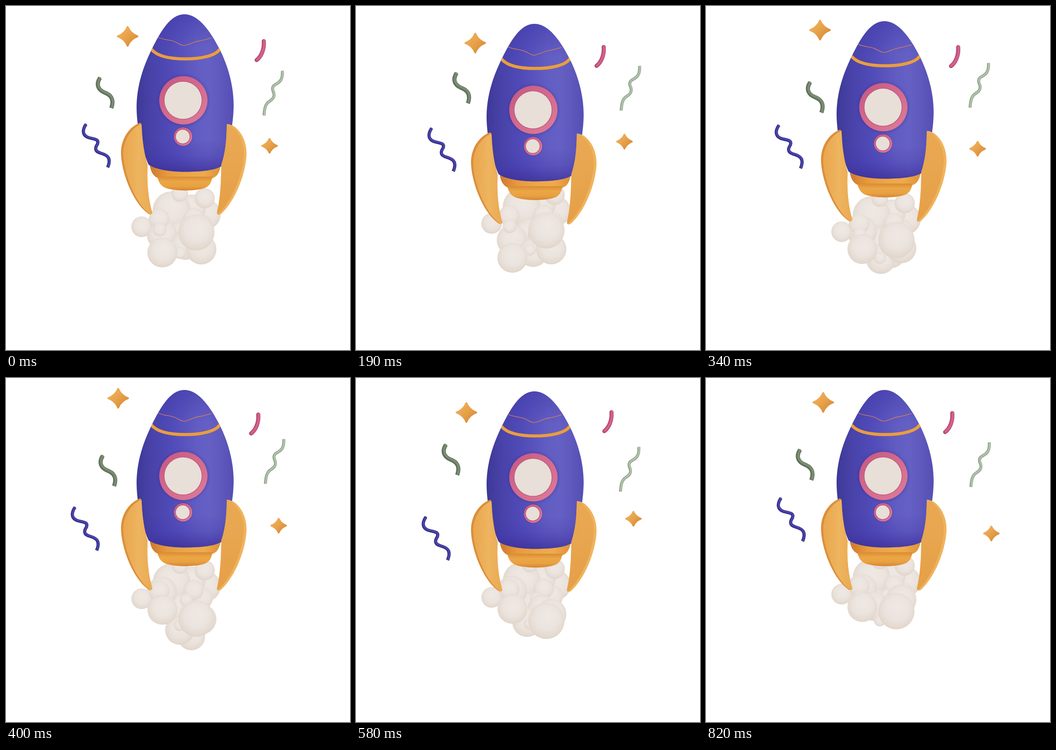
Recreate the animation shown at these times as an HTML page with a canvas. Size 748x748 px, loop 850 ms.

```html
<!DOCTYPE html>
<html lang="en">
<head>
<meta charset="utf-8">
<title>Rocket</title>
<style>
  html, body { margin: 0; width: 100%; height: 100%; overflow: hidden; background: #fff; }
  canvas { display: block; width: 748px; height: 748px; }
</style>
</head>
<body>
<canvas id="stage" width="748" height="748"></canvas>
<script>
const ctx = document.getElementById('stage').getContext('2d');
const LOOP = 850, HOLD = 70, STEP = 30;
const KEYS = [0, 3, 8, 12, 18, 22, 26], LAST = KEYS.length - 1;

// Smooth wander from 0 through the given offsets at the key steps
function wander(...offsets) {
  const v = [0, ...offsets];
  const slope = i => {
    const a = Math.max(i - 1, 0), b = Math.min(i + 1, LAST);
    return (v[b] - v[a]) / (KEYS[b] - KEYS[a]);
  };
  return k => {
    let i = 0;
    while (i < LAST - 1 && k >= KEYS[i + 1]) i++;
    const h = KEYS[i + 1] - KEYS[i], u = (k - KEYS[i]) / h, w = 1 - u;
    return v[i] * w * w * (1 + 2 * u) + v[i + 1] * u * u * (3 - 2 * u)
      + h * u * w * (slope(i) * w - slope(i + 1) * u);
  };
}
const still = () => 0;

function gradient(coords, ...colors) {
  const g = coords.length === 4 ? ctx.createLinearGradient(...coords) : ctx.createRadialGradient(...coords);
  colors.forEach((c, i) => g.addColorStop(i / (colors.length - 1), c));
  return g;
}
function fill(path, color) {
  ctx.fillStyle = color;
  ctx.fill(path);
}
function line(path, width, color, cap = 'butt') {
  ctx.lineWidth = width;
  ctx.lineCap = cap;
  ctx.lineJoin = 'round';
  ctx.strokeStyle = color;
  ctx.stroke(path);
}
function disc(x, y, r, color) {
  ctx.beginPath();
  ctx.arc(x, y, r, 0, Math.PI * 2);
  ctx.fillStyle = color;
  ctx.fill();
}
function place(x, y, draw) {
  ctx.save();
  ctx.translate(x, y);
  draw();
  ctx.restore();
}
function inside(path, draw) {
  ctx.save();
  ctx.clip(path);
  draw();
  ctx.restore();
}

// Rocket
const body = new Path2D('M388 18C357 18 336 56 317.500 93C299 130 283 175 284 225C285 270 297 315 310 345C325 355 355 360.500 390 360.500C425 360.500 455 357 469 348C483 310 495 260 495 215C495 170 481 126 464 93C445 56 419 18 388 18Z');
const seam = new Path2D('M331 68C342 74 358 73 368 78C378 83 384 88 392 85C403 82 410 77 420 76C432 74 440 71 447 69');
const band = new Path2D('M317 95C330 110 360 115 390 115C425 115 455 108 464 95');
const ring = new Path2D('M312 342L468 344C464 362 460 370 450 374C430 383 350 383 330 374C320 370 314 360 312 342Z');
const nozzle = new Path2D('M329 371C332 385 338 391 344 394C360 403 415 404 436 394C444 389 447 382 449 371Z');
const finL = new Path2D('M291 254C270 262 251 285 250 318C250 360 275 425 306 449C312 455 318 454 318 449C308 415 306 375 308 346C300 320 296 290 295 262C295 256 293 254 291 254Z');
const finR = new Path2D('M480 257C483 256 488 258 495 261C515 275 524 300 523 325C520 370 497 425 468 452C462 456 458 454 459 448C466 420 468 380 468 346C477 320 480 290 480 257Z');

const bodyFill = gradient([284, 0, 495, 0], '#3d3897', '#4741a6', '#4c46b1', '#524cb9', '#5a54be', '#625dc3', '#6560c4', '#5f59bd', '#544eb5');
const bodyShade = gradient([0, 290, 0, 361], 'rgba(62,48,165,0)', 'rgba(62,48,165,.25)', 'rgba(55,42,145,.7)');
const noseShade = gradient([0, 18, 0, 90], 'rgba(62,55,165,.5)', 'rgba(62,55,165,0)');
const ringFill = gradient([312, 0, 468, 0], '#cf772c', '#e79a3e', '#eca648', '#efab4b', '#dd9139');
const nozzleFill = gradient([0, 371, 0, 402], '#d98b36', '#eba645', '#e9a242', '#d68232');
const finFillL = gradient([255, 0, 312, 0], '#eaa850', '#eeb45f', '#ebaa53');
const finFillR = gradient([470, 260, 515, 420], '#e9a851', '#e7a64f', '#e6a048');

function porthole(x, y, r, glass) {
  ctx.save();
  ctx.shadowColor = 'rgba(45,35,130,.5)';
  ctx.shadowBlur = r / 6;
  disc(x, y, r, gradient([x - r, y - r, x + r, y + r], '#c2567f', '#d0648b', '#d8708f', '#de7c9c'));
  ctx.restore();
  disc(x - .7, y, glass + 1.5, '#bd5a7d');
  disc(x - .7, y, glass, '#e8dfd8');
}

function rocket() {
  fill(ring, ringFill);
  fill(nozzle, nozzleFill);
  [bodyFill, bodyShade, noseShade].forEach(color => fill(body, color));
  inside(body, () => {
    line(seam, 1.3, '#d98055');
    line(band, 7, '#dc8e38', 'round');
    line(band, 4.5, '#f0a94b', 'round');
    line(band, .8, '#cc7f32');
  });
  porthole(385.7, 205, 52.5, 40.5);
  porthole(385, 284, 20, 15);

  fill(finL, '#db8f3b');
  inside(finL, () => place(5, 2, () => fill(finL, finFillL)));
  fill(finR, '#efb35c');
  inside(finR, () => place(-6, 0, () => fill(finR, finFillR)));
}
const bob = wander(16.5, 22, 8, 11, 15, 8);

// Smoke: neighbouring puffs share a motion
const drift = wander(-21, 17, 0, -3, -2, -10);
const left = wander(4, 16, -32, -34, -17, -38);
const right = wander(-5, 2, 31, 36, 18, 15);
const tail = wander(6, 29, 28, 11, 21, -24);
const rise = k => -47 * (k / 26) ** 3;
const dip = k => 62 * Math.exp(-(((k - 12) / 3) ** 2));
const slide = k => -k;

const puff = (r, x, y, dy = drift, dx = still) => ({ r, x, y, dx, dy });
const smoke = [
  puff(33, 434, 453),
  puff(30, 404, 440),
  puff(41, 360, 444),
  puff(25, 425, 478),
  puff(22, 432, 418),
  puff(18, 378, 408),
  puff(22, 408, 461),
  puff(30, 375, 500),
  puff(33, 339, 497, left),
  puff(22.5, 295, 480),
  puff(22.5, 333, 463),
  puff(15, 334, 486),
  puff(14, 392, 483),
  puff(30, 403, 500, dip),
  puff(32, 390, 520, tail, slide),
  puff(33, 424.5, 529, rise),
  puff(13, 378, 537),
  puff(32.5, 340, 536, left),
  puff(39.5, 414, 492, right)
];
function drawPuff({ r, x, y, dx, dy }, k) {
  const shade = gradient([r * .1, -r * .3, 0, 0, -r * .05, r * 1.3],
    '#eee8e3', '#ede6e1', '#ebe4de', '#e4dad1', '#d8c9bb');
  place(x + dx(k), y + dy(k), () => disc(0, 0, r, shade));
}

// Confetti
function ribbon(d, width, dark, light, cap = 'butt') {
  const p = new Path2D(d);
  return () => {
    line(p, width, dark, cap);
    place(width * .1, -width * .1, () => line(p, width * .5, light, cap));
  };
}
function star(size) {
  const s = size - 2, c = size * .25;
  const p = new Path2D(`M0 ${1 - s}Q${c} ${-c} ${s} 0Q${c} ${c} 0 ${s - 1}Q${-c} ${c} ${-s} 0Q${-c} ${-c} 0 ${1 - s}Z`);
  const g = gradient([-s / 2, -s / 2, s / 2, s / 2], '#ecab57', '#e7a148', '#dc933f');
  return () => {
    fill(p, g);
    line(p, 4, g);
  };
}
const confetti = [
  { draw: star(23.5), x: k => 252 + 12.5 * Math.cos(k * .19), y: k => 66 + starY(k) },
  { draw: star(18), x: k => 573 + 1.75 * k + 2 * Math.sin(k * .31), y: k => 304 + sparkY(k) },
  {
    draw: ribbon('M560.5 76.5C562 94 555 110 545 117.5', 9, '#bd4a75', '#d2638c', 'round'),
    x: wander(-24, -13, -12, -5, -16, -25), y: wander(5, 21, 3, -2, 26, 0)
  },
  {
    draw: ribbon('M601 141C602 160 596 165 587 170C577 175 579 182 582 188C585 198 580 203 573 207C563 213 562 225 561 238', 6.5, '#8fa48b', '#b3c3ae'),
    x: wander(8, 23, 3, 14, 17, 15), y: wander(-2, -22, -8, 9, 15, -1)
  },
  {
    draw: ribbon('M204.5 156C194 172 202 183 214 188C228 193 236 203 229 222', 9, '#5f7059', '#7c8d74'),
    x: wander(0, 33, 6, -9, 1, 0), y: wander(-15, 2, 13, -11, -8, 0)
  },
  {
    draw: ribbon('M174 257C164 272 168 282 179 286C192 290 203 289 199 300C191 312 196 317 206 320C220 324 230 330 221 351', 7, '#352f8c', '#4b45ab'),
    x: wander(-11, -7, -24, -22, -30, -11), y: wander(23, -14, 24, 45, 14, 4)
  }
];
const starY = wander(19, 0, -22, 9, -5, -13);
const sparkY = wander(-8, -6, 17, 2, 14, 34);

function render(k) {
  ctx.fillStyle = '#fff';
  ctx.fillRect(0, 0, 748, 748);
  smoke.forEach(p => drawPuff(p, k));
  place(0, bob(k), rocket);
  confetti.forEach(({ draw, x, y }) => place(x(k), y(k), draw));
}

const start = performance.now();
let shown = -1;
function tick() {
  const t = (performance.now() - start) % LOOP;
  const k = t < HOLD ? 0 : 1 + Math.floor((t - HOLD) / STEP);
  if (k !== shown) render(shown = k);
  requestAnimationFrame(tick);
}
tick();
</script>
</body>
</html>
```
